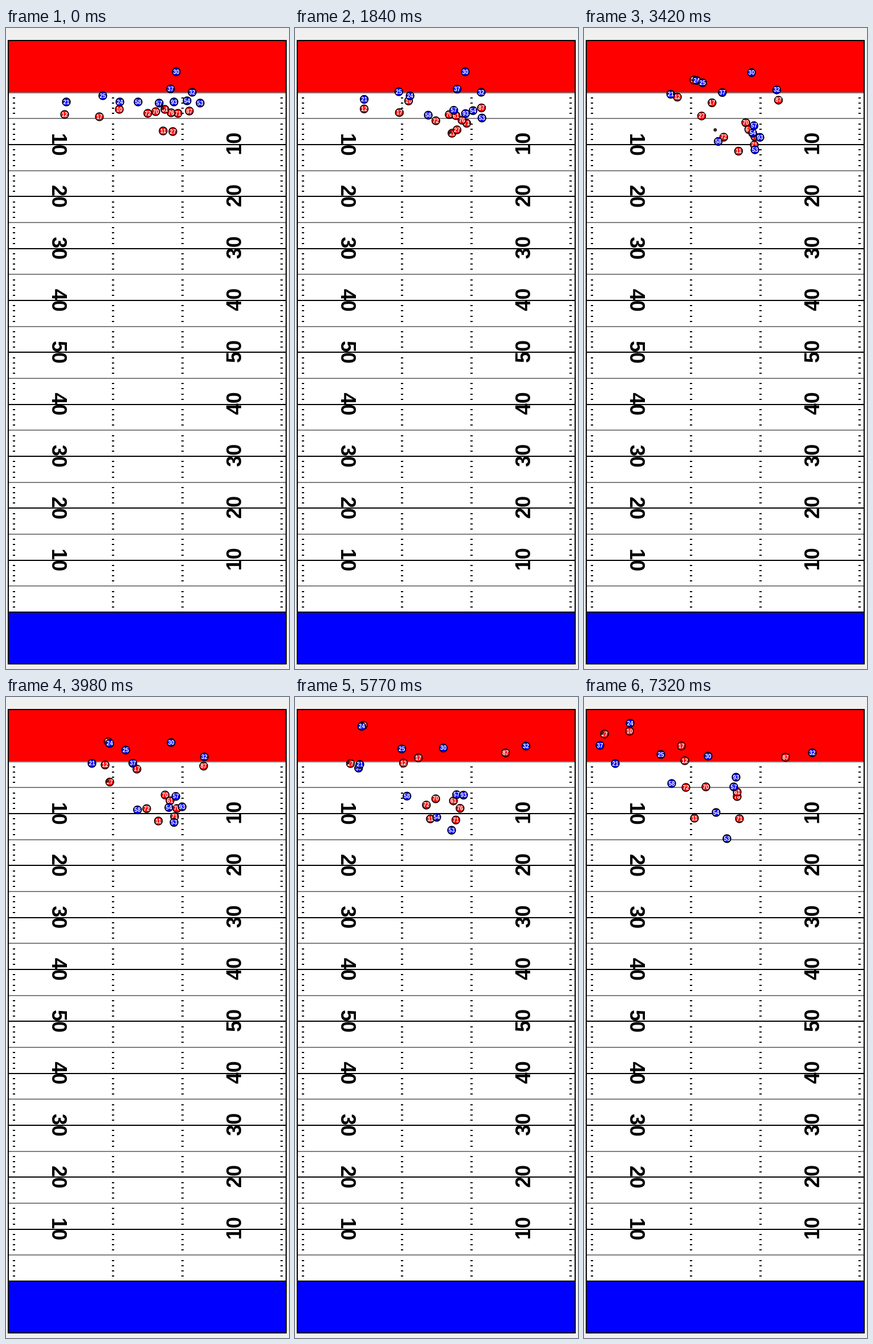
Animation, 497 px wide and 1127 px high, one loop 7410 ms. Source, as an HTML page with a canvas:

```html
<!DOCTYPE html>
<html lang="en">
<head>
<meta charset="utf-8">
<title>Football play</title>
<style>
  html, body { margin: 0; width: 100%; height: 100%; overflow: hidden; background: #f0f0f0; }
  canvas { display: block; }
</style>
</head>
<body>
<canvas id="stage" width="497" height="1127"></canvas>
<script>
const ctx = document.getElementById('stage').getContext('2d');
const FONT = '"Liberation Sans", Arial, sans-serif';
const RED = '#f00', BLUE = '#00f', BLACK = '#000', GRAY = '#808080', WHITE = '#fff';
const LOOP = 7410, STEPS = 65;
const LEFT = 4, RIGHT = 492, TOP = 22, BOTTOM = 1118;
const WIDTH = RIGHT - LEFT, YARD = (BOTTOM - TOP) / 120;

const mix = (a, b, u) => a + (b - a) * u;
const clamp01 = u => Math.min(1, Math.max(0, u));

// A route begins at rest on step `start`; its later points fall on these steps.
const ROUTE_STEPS = [0, 25, 45, 64];
const players = [];

function player(color, number, start, ...points) {
  const steps = ROUTE_STEPS.slice(-points.length);
  steps[0] = start;
  const along = axis => curve(steps, points.map(p => p[axis]));
  const route = { color, number, x: along(0), y: along(1) };
  players.push(route);
  return route;
}

// Constant acceleration on the first leg, smooth cubic legs after it.
function curve(steps, values) {
  const last = steps.length - 1;
  const slopeBetween = (i, j) => (values[j] - values[i]) / (steps[j] - steps[i]);
  const slopes = values.map((_, i) =>
    i === 0 ? 0 :
    i === 1 ? 2 * slopeBetween(0, 1) :
    slopeBetween(i - 1, Math.min(i + 1, last)));

  return step => {
    if (step <= steps[0]) return values[0];
    if (step >= steps[last]) return values[last];
    const i = steps.findIndex(s => s > step) - 1;
    const span = steps[i + 1] - steps[i];
    const u = (step - steps[i]) / span;
    return mix(values[i], values[i + 1], u * u * (3 - 2 * u))
      + span * u * (1 - u) * (slopes[i] * (1 - u) - slopes[i + 1] * u);
  };
}

player(RED, 87, 0, [322, 146], [366, 103], [354, 106]);
player(RED, 17, 0, [164, 156], [211, 138], [226, 114], [171, 86]);
player(RED, 12, 0, [103, 152], [148, 128], [190, 118], [177, 112]);
player(RED, 10, 0, [199, 143], [200, 107], [135, 52], [80, 60]);
player(RED, 70, 0, [263, 147], [282, 160], [257, 182], [214, 158]);
player(RED, 71, 0, [302, 150], [301, 193], [286, 215], [273, 214]);
player(RED, 76, 0, [290, 149], [298, 181], [295, 199], [269, 175]);
const center = player(RED, 61, 0, [279, 143], [288, 170], [281, 185], [269, 167]);
player(RED, 72, 0, [249, 150], [245, 182], [243, 196], [179, 159]);
const passer = player(RED, 11, 10, [276, 181], [274, 206], [250, 214], [194, 213]);
const runner = player(RED, 27, 10, [293, 182], [240, 164], [122, 132], [36, 65]);

player(BLUE, 30, 19, [299, 77], [218, 104]);
player(BLUE, 37, 10, [289, 107], [148, 127], [28, 85]);
player(BLUE, 32, 19, [327, 113], [391, 90], [401, 98]);
player(BLUE, 24, 0, [200, 130], [205, 104], [132, 57], [81, 46]);
player(BLUE, 25, 0, [170, 119], [200, 102], [200, 90], [135, 101]);
player(BLUE, 21, 0, [106, 130], [144, 119], [129, 119], [55, 117]);
player(BLUE, 58, 0, [232, 130], [237, 187], [209, 180], [154, 152]);
player(BLUE, 57, 0, [269, 132], [293, 163], [289, 174], [263, 158]);
player(BLUE, 93, 0, [295, 130], [306, 180], [303, 180], [267, 141]);
player(BLUE, 54, 0, [318, 128], [305, 170], [257, 210], [232, 203]);
player(BLUE, 53, 0, [341, 132], [310, 196], [283, 228], [251, 249]);

// The ball goes from the center to the passer, then to the runner.
function ballAt(step, axis) {
  const snap = clamp01((step - 2) / 10);
  const toss = clamp01((step - 26) / 7);
  const held = mix(center[axis](step), passer[axis](step), snap);
  return mix(held, runner[axis](step), toss);
}

function line(x0, x1, y, color) {
  ctx.strokeStyle = color;
  ctx.beginPath();
  ctx.moveTo(x0, y);
  ctx.lineTo(x1, y);
  ctx.stroke();
}

function yardNumber(text, x, y, angle) {
  ctx.save();
  ctx.translate(x, y);
  ctx.rotate(angle);
  ctx.fillText(text, 0, 0);
  ctx.restore();
}

function band(color, y, height) {
  ctx.fillStyle = color;
  ctx.fillRect(LEFT, y, WIDTH, height);
}

function drawField() {
  ctx.fillStyle = '#f0f0f0';
  ctx.fillRect(0, 0, 497, 1127);
  band(WHITE, TOP, BOTTOM - TOP);
  band(RED, TOP, 10 * YARD);
  band(BLUE, BOTTOM - 10 * YARD, 10 * YARD);

  ctx.lineWidth = 2;
  ctx.textAlign = 'center';
  ctx.font = `bold 36px ${FONT}`;
  ctx.fillStyle = BLACK;
  for (let yard = 0; yard <= 100; yard++) {
    const y = TOP + (10 + yard) * YARD;
    const row = Math.ceil(y - 0.01);
    if (yard % 5) {
      for (const x of [12, 186, 308, 482]) line(x, x + 4, row, BLACK);
      continue;
    }
    const tens = yard > 0 && yard % 10 === 0;
    line(LEFT, RIGHT, row, tens ? BLACK : GRAY);
    if (tens && yard < 100) {
      const label = Math.min(yard, 100 - yard);
      yardNumber(label, 81, y, Math.PI / 2);
      yardNumber(label, 413, y - 1, -Math.PI / 2);
    }
  }
  ctx.strokeStyle = BLACK;
  ctx.strokeRect(LEFT, TOP, WIDTH, BOTTOM - TOP);
}

function disc(x, y, radius, color) {
  ctx.beginPath();
  ctx.arc(x, y, radius, 0, 2 * Math.PI);
  ctx.fillStyle = color;
  ctx.fill();
  ctx.strokeStyle = BLACK;
  ctx.stroke();
}

function drawPlay(step) {
  ctx.lineWidth = 1.5;
  ctx.font = `bold 10px ${FONT}`;
  for (const { color, number, x, y } of players) {
    disc(x(step), y(step), 7, color);
    ctx.fillStyle = WHITE;
    ctx.fillText(number, x(step), y(step) + 3.5);
  }
  ctx.lineWidth = 1;
  disc(ballAt(step, 'x') - 4, ballAt(step, 'y') - 2, 2.5, '#5a2010');
}

function tick() {
  const step = Math.floor(performance.now() % LOOP / LOOP * STEPS);
  drawField();
  drawPlay(step);
  requestAnimationFrame(tick);
}
tick();
</script>
</body>
</html>
```
